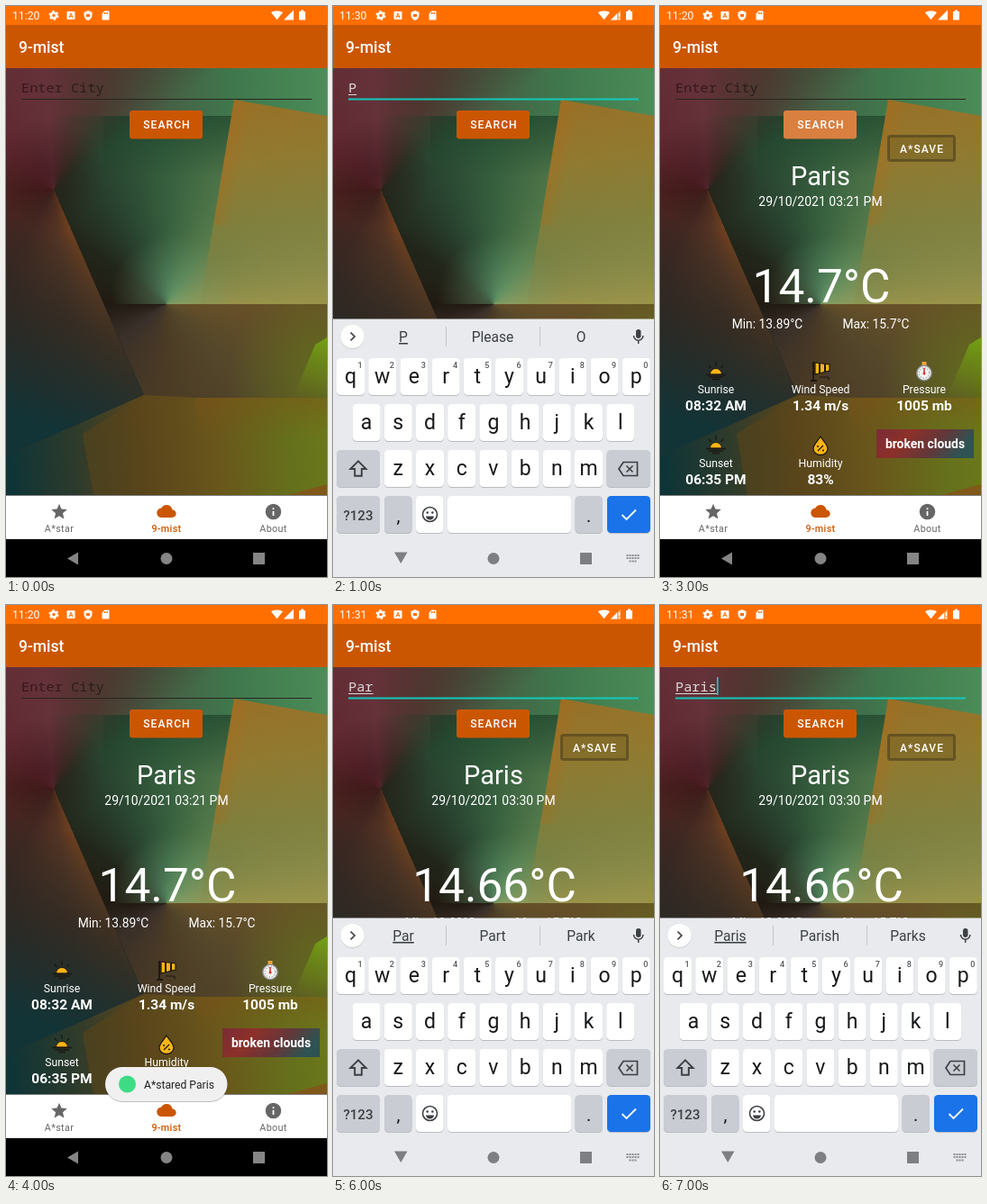
An HTML page with a canvas for the animation above (8000 ms loop, 356 by 634 pixels).

```html
<!DOCTYPE html>
<html lang="en">
<head>
<meta charset="utf-8">
<title>9-mist</title>
<style>
html, body { margin: 0; width: 100%; height: 100%; overflow: hidden; background: #000; }
canvas, svg { position: absolute; left: 0; top: 0; width: 356px; height: 634px; }
text { font-family: Roboto, sans-serif; white-space: pre; }
.mono { font-family: "Noto Sans Mono", "DejaVu Sans Mono", monospace; }
</style>
</head>
<body>
<canvas id="wall" width="356" height="634"></canvas>
<svg id="stage" viewBox="0 0 356 634"></svg>
<script>
const LOOP = 8000;
const ORANGE = '#cb5602', TEAL = '#12c9bb', GREY = '#666', INK = '#3c4043';

// ---- wallpaper ----
const ctx = document.getElementById('wall').getContext('2d');
const ALL = [0, 69, 356, 69, 356, 543, 0, 543];

function stops(g, list) {
  list.forEach(([at, color]) => g.addColorStop(at, color));
  return g;
}
const conic = (x, y, list) => stops(ctx.createConicGradient(0, x, y), list);
const linear = (x1, y1, x2, y2, list) => stops(ctx.createLinearGradient(x1, y1, x2, y2), list);
const radial = (x, y, r, list) => stops(ctx.createRadialGradient(x, y, 0, x, y, r), list);

function poly(points, fill) {
  ctx.beginPath();
  for (let i = 0; i < points.length; i += 2) ctx.lineTo(points[i], points[i + 1]);
  ctx.fillStyle = fill;
  ctx.fill();
}

function paintWall() {
  poly(ALL, conic(178, 331, [
    [0, '#675028'], [.12, '#54472a'], [.25, '#4b3b25'], [.4, '#3a302a'], [.5, '#211a12'],
    [.6, '#22261a'], [.68, '#294430'], [.75, '#365f3e'], [.84, '#557b4b'], [.92, '#7c874a'], [1, '#9a934a']]));
  poly([0, 69, 356, 69, 356, 331, 0, 331], radial(186, 323, 70, [[0, 'rgba(110,165,120,.55)'], [1, 'rgba(110,165,120,0)']]));
  poly([108, 122, 356, 122, 356, 240, 108, 240], linear(0, 122, 0, 190, [[0, 'rgba(22,62,40,.6)'], [1, 'rgba(22,62,40,0)']]));
  poly([0, 69, 356, 69, 356, 122, 0, 122], linear(0, 0, 356, 0, [
    [0, '#6b2f37'], [.2, '#573b35'], [.42, '#4a5742'], [.7, '#3f774c'], [1, '#4b8c58']]));
  // warm slab on the right
  poly([253, 104, 356, 122, 356, 331, 215, 331, 230, 243], linear(265, 105, 300, 331, [
    [0, '#987027'], [.3, '#917a31'], [.62, 'rgba(132,128,60,.85)'], [1, 'rgba(132,134,70,0)']]));
  poly([253, 104, 274, 108, 250, 243, 230, 243], linear(238, 170, 262, 174, [
    [0, 'rgba(170,105,25,.45)'], [1, 'rgba(170,105,25,0)']]));
  // red and rust fan on the left
  poly([0, 69, 356, 69, 356, 122, 153, 432, 0, 500], conic(53, 204, [
    [0, 'rgba(40,36,24,0)'], [.184, 'rgba(40,36,24,0)'], [.185, '#6e401f'], [.23, '#573523'],
    [.33, '#442821'], [.5, '#4b211f'], [.62, '#602730'], [.74, '#65323a'],
    [.82, 'rgba(76,50,44,.7)'], [.9, 'rgba(50,45,32,0)'], [1, 'rgba(40,36,24,0)']]));
  poly([0, 150, 53, 204, 153, 432, 0, 500], linear(85, 255, 20, 460, [
    [0, 'rgba(22,40,40,0)'], [.45, 'rgba(30,38,36,.6)'], [1, '#123437']]));
  poly(ALL, radial(48, 186, 62, [[0, 'rgba(40,12,14,.45)'], [1, 'rgba(40,12,14,0)']]));
  // lower panels
  poly([0, 500, 153, 432, 210, 435, 356, 435, 356, 543, 0, 543], linear(0, 500, 356, 470, [
    [0, '#0d3437'], [.2, '#2b3a2c'], [.42, '#57451d'], [.65, '#69561b'], [.88, '#65701c'], [1, '#6b781a']]));
  poly([85, 475, 153, 432, 356, 435, 356, 543, 97, 543], linear(85, 500, 220, 490, [
    [0, 'rgba(98,70,20,.5)'], [1, 'rgba(98,70,20,0)']]));
  poly([210, 435, 356, 435, 356, 480, 210, 480], linear(0, 435, 0, 480, [
    [0, 'rgba(125,82,24,.45)'], [1, 'rgba(125,82,24,0)']]));
  poly([200, 331, 356, 331, 356, 435, 200, 435], radial(356, 410, 110, [
    [0, 'rgba(100,120,25,.75)'], [1, 'rgba(100,120,25,0)']]));
  poly([356, 368, 343, 376, 318, 435, 356, 435], linear(350, 370, 342, 435, [
    [0, '#72a013'], [1, 'rgba(110,140,20,0)']]));
  poly([312, 543, 356, 531, 356, 543], '#80581a');
}

// ---- drawing helpers ----
const attrs = o => Object.entries(o).map(([k, v]) => ` ${k}="${v}"`).join('');
const tag = (name, o) => `<${name}${attrs(o)}/>`;
const rect = (x, y, width, height, fill, more = {}) => tag('rect', { x, y, width, height, fill, ...more });
const disc = (cx, cy, r, fill, more = {}) => tag('circle', { cx, cy, r, fill, ...more });
const path = (d, fill, more = {}) => tag('path', { d, fill, ...more });
const line = (d, stroke, w = 1, more = {}) => path(d, 'none', { stroke, 'stroke-width': w, ...more });
const text = (x, y, size, str, more = {}) =>
  `<text${attrs({ x, y, 'font-size': size, fill: '#fff', 'text-anchor': 'middle', ...more })}>${str}</text>`;
const group = (id, body) => `<g id="${id}">${body}</g>`;
const icon = (cx, cy, size, d, fill) =>
  path(d, fill, { transform: `translate(${cx - size / 2} ${cy - size / 2}) scale(${size / 24})`, 'fill-rule': 'evenodd' });

const STAR = 'M12 17.3 18.2 21l-1.6-7L22 9.2l-7.2-.6L12 2 9.2 8.600 2 9.200 7.500 14 5.800 21z';
const CLOUD = 'M19.400 10A7.500 7.500 0 0 0 5.400 8 6 6 0 0 0 6 20H19a5 5 0 0 0 .4-10z';
const INFO = 'M12 2a10 10 0 1 0 0 20 10 10 0 0 0 0-20zM11 7h2v2h-2zM11 11h2v6h-2z';
const SHIELD = 'M12 1 3 5v6c0 5.500 3.800 10.700 9 12 5.200-1.300 9-6.500 9-12V5zM8 9h8v6H8z';
const CARD = 'M18 2h-8L4 8v12a2 2 0 0 0 2 2h12a2 2 0 0 0 2-2V4a2 2 0 0 0-2-2zM9 5h2v4H9zM12 5h2v4h-2zM15 5h2v4h-2z';
const WIFI = 'M12 21.500 24 7C19 2.500 5 2.500 0 7z';
const SHIFT = 'M12 3 3 12h5v8h8v-8h5z';

function statusBar() {
  const gear = disc(53, 10.500, 3, 'none', { stroke: '#fff', 'stroke-width': 2.600 }) +
    disc(53, 10.500, 4.700, 'none', { stroke: '#fff', 'stroke-width': 1.600, 'stroke-dasharray': '2.46 2.46' });
  return rect(0, 0, 356, 21, '#ff6f00') + rect(0, 21, 356, 48, ORANGE) +
    text(7, 15, 12.200, '', { id: 'clock', 'text-anchor': 'start' }) + gear +
    rect(67.500, 6, 9, 9, '#fff', { rx: 1 }) + text(72, 13.300, 7.500, 'A', { fill: '#ff6f00', 'font-weight': 700 }) +
    icon(91, 10.500, 12, SHIELD, '#fff') + icon(110.500, 10.500, 12, CARD, '#fff') +
    icon(300.500, 10, 13, WIFI, '#fff') +
    group('full', path('M308 15.500h11V4.500z', '#fff')) +
    group('weak', path('M308 15.500h11V4.500z', '#fff', { opacity: .4 }) + path('M308 15.500h7V8.500z', '#fff') +
      line('M317.500 8v4M317.500 13.500v2', '#fff', 1.300)) +
    path('M325 6h2v-1.500h3v1.500h2v9.500h-7z', '#fff') +
    text(14, 52, 17.500, '9-mist', { 'text-anchor': 'start', 'font-weight': 500 });
}

function form() {
  return text(17, 96, 15.300, 'Enter City', { id: 'hint', class: 'mono', fill: '#000', 'fill-opacity': .48, 'text-anchor': 'start' }) +
    text(17, 96, 15.300, '', { id: 'typed', class: 'mono', fill: '#dcd9d8', 'text-anchor': 'start' }) +
    line('', '#dcd9d8', 1, { id: 'compose' }) +
    rect(63, 80, 1.700, 20, TEAL, { id: 'caret' }) +
    line('M17 103.500H339', '#222', 1, { id: 'rule' }) +
    rect(137, 116, 81, 31.500, ORANGE, { id: 'search', rx: 3 }) +
    text(178.500, 136, 12.100, 'SEARCH', { 'font-weight': 500, 'letter-spacing': 1.050 });
}

function sun(y) {
  return path(`M55.500 ${y + 4}a6.500 6.500 0 0 1 13 0z`, '#fdb515', { stroke: '#1c1712' }) +
    line(`M51 ${y + 4.500}h22M54 ${y + 7}h16M58 ${y + 9.500}h8`, '#1c1712', 1.300) +
    line(`M62 ${y - 10}v5M54 ${y - 6}l2.500 3M70 ${y - 6}l-2.500 3`, '#1c1712', 1.300);
}

function windsock() {
  return line('M170 395v21M167 416h7', '#1c1712', 1.800) +
    path('M172 396 188 398v7l-16 4z', '#fdb515', { stroke: '#1c1712', 'stroke-width': 1.200 }) +
    line('M177 397v10.500M183 398v8', '#1c1712', 2) +
    line('M177 412h8q3 0 2 3', '#1c1712', 1.200);
}

function gauge() {
  return rect(290.500, 395, 5, 4, '#f0a23c') + disc(293, 407.500, 8.200, '#f4f4f2', { stroke: '#8d8f94', 'stroke-width': 1.500 }) +
    disc(293, 407.500, 5.700, 'none', { stroke: '#555', 'stroke-width': 1, 'stroke-dasharray': '1 2' }) +
    line('M293 402v6', '#d8342e', 1.600) + disc(293, 408, 1.500, '#d8342e');
}

function results() {
  const pair = (x, y, name, value) => text(x, y, 12.250, name) + text(x, y + 19, 15.500, value, { 'font-weight': 700 });
  return text(178, 198.500, 29, 'Paris') + text(178, 221.500, 14, '', { id: 'date' }) +
    text(179, 329, 51.400, '', { id: 'temp' }) +
    text(119, 357.500, 13.800, 'Min: 13.89°C') + text(239.500, 357.500, 13.800, 'Max: 15.7°C') +
    sun(405) + windsock() + gauge() + sun(487) +
    path('M178 478c3 5 8 9 8 13.500a8 7 0 0 1-16 0c0-4.500 5-8.500 8-13.500z', '#fdb515', { stroke: '#1c1712', 'stroke-width': 1.300 }) +
    line('M175 494l6-6', '#1c1712', 1.200) + disc(175, 489, 1, '#1c1712') + disc(181, 493.500, 1, '#1c1712') +
    pair(62, 430, 'Sunrise', '08:32 AM') + pair(178, 430, 'Wind Speed', '1.34 m/s') +
    pair(293, 430, 'Pressure', '1005 mb') + pair(62, 512, 'Sunset', '06:35 PM') + pair(178, 512, 'Humidity', '83%') +
    rect(240, 470, 108, 32, 'url(#badge)') + text(294, 491, 13.900, 'broken clouds', { 'font-weight': 700 }) +
    group('save', rect(253.500, 144.500, 73, 27, 'rgba(90,75,25,.25)', { rx: 2, stroke: '#57481f', 'stroke-width': 3, 'stroke-opacity': .75 }) +
      text(290.500, 162.500, 12, 'A*SAVE', { 'font-weight': 500, 'letter-spacing': 1.050 }));
}

function tabs() {
  const label = (x, str, fill, weight = 400) =>
    text(x, 584, 10.800, str, { fill, 'font-weight': weight, 'letter-spacing': .35 });
  return rect(0, 543.500, 356, 49, '#fff') + rect(0, 592, 356, 42, '#000') +
    icon(59, 561.500, 21, STAR, GREY) + icon(178, 561, 21, CLOUD, ORANGE) + icon(296.500, 561.500, 21, INFO, GREY) +
    label(59, 'A*star', GREY) + label(178, '9-mist', ORANGE, 500) + label(296.500, 'About', GREY) +
    path('M68 613.500 80 606.500v14z', '#858585') + homeButtons('#858585');
}

const homeButtons = fill => disc(178, 613.500, 6.500, fill) + rect(274, 607, 13, 13, fill);

function toast() {
  return rect(110, 514, 135.500, 38, '#000', { rx: 19, opacity: .25 }) + rect(110, 513, 135.500, 38, '#f1f0f0', { rx: 19 }) +
    disc(134.500, 532, 9.500, '#3ddc84') + text(192, 536.500, 12.150, 'A*stared Paris', { fill: '#222' });
}

function key(x, y, w, fill = '#fff') {
  return rect(x, y + 1, w, 41, '#b9bcc1', { rx: 4.500 }) + rect(x, y, w, 41, fill, { rx: 4.500 });
}

function keyboard() {
  const PITCH = 35.200, DIM = '#c9ccd2';
  const row = (letters, x0, y, digits) => [...letters].map((c, i) => {
    const x = x0 + i * PITCH;
    return key(x, y, 31) + text(x + 15.500, y + 28, 23, c, { fill: '#17181a' }) +
      (digits ? text(x + 26, y + 11, 9, (i + 1) % 10, { fill: '#55585c', 'font-weight': 500 }) : '');
  }).join('');
  const words = [78, 177, 275].map((x, i) => text(x, 373, 15.600, '', { id: 'word' + i, fill: INK })).join('');
  return rect(0, 347.500, 356, 287, '#e8eaed') +
    disc(21.500, 368, 13, '#c9ccd0') + disc(21.500, 367, 13, '#fff') + line('M19.500 362.500l4.500 4.500-4.500 4.500', INK, 1.700) +
    words + line('M125.500 356v22M229.500 356v22', '#c4c7cb') +
    rect(336, 359, 5.500, 10, INK, { rx: 2.750 }) + line('M333.500 366a5.200 5.200 0 0 0 10.400 0M338.700 371v4', INK, 1.500) +
    row('qwertyuiop', 4, 391, true) + row('asdfghjkl', 21.600, 442) + row('zxcvbnm', 56.800, 493) +
    key(4, 493, 48, DIM) + icon(28, 514, 23, SHIFT, 'none').replace('/>', ` stroke="${INK}" stroke-width="2"/>`) +
    key(303.500, 493, 48.500, DIM) + line('M317 514l5-7.500h15.500v15H322z', INK, 1.700) + line('M325.500 510.500l7 7m0-7l-7 7', INK, 1.600) +
    key(4, 544, 48, DIM) + text(28, 570.500, 15, '?123', { fill: INK, 'font-weight': 500 }) +
    key(57, 544, 30.500, DIM) + text(72.500, 573, 20, ',', { fill: '#17181a' }) +
    key(92, 544, 30.500) + disc(107.500, 564.500, 8, 'none', { stroke: INK, 'stroke-width': 1.600 }) +
    disc(104.700, 562.500, 1.300, INK) + disc(110.300, 562.500, 1.300, INK) + path('M103 566.500h9a4.500 4 0 0 1-9 0z', INK) +
    key(127, 544, 137) + key(268.500, 544, 30.500, DIM) + text(283.700, 573, 20, '.', { fill: '#17181a' }) +
    key(304, 544, 48, '#1a73e8') + line('M320.500 565l5 5 10.500-10.500', '#fff', 1.900) +
    path('M68 606.500h14.500l-7.250 12.500z', '#7d7f82') + homeButtons('#7d7f82') +
    line('M325.500 610h14M325.500 613h14M328.500 616.500h8', '#8b8d90', 1.800, { 'stroke-dasharray': '2 1' });
}

paintWall();
document.getElementById('stage').innerHTML =
  `<defs><linearGradient id="badge" x2="1" y2=".25"><stop stop-color="#7a2c37"/><stop offset=".35" stop-color="#8d3029"/>
  <stop offset=".7" stop-color="#63373a"/><stop offset="1" stop-color="#2e5352"/></linearGradient></defs>` +
  statusBar() + form() + group('result', results()) + tabs() + group('toast', toast()) + group('keys', keyboard());

// ---- timeline ----
const EARLY = { date: '29/10/2021 03:21 PM', temp: '14.7°C' };
const LATE = { date: '29/10/2021 03:30 PM', temp: '14.66°C' };
const P = ['P', 'Please', 'O'], PAR = ['Par', 'Part', 'Park'], PARIS = ['Paris', 'Parish', 'Parks'];
const STEPS = [
  { at: 0, clock: '11:20' },
  { at: 1000, clock: '11:30', words: P },
  { at: 2000, clock: '11:30', words: PARIS, caret: true },
  { at: 3000, clock: '11:20', data: EARLY, save: true, pressed: true },
  { at: 4000, clock: '11:20', data: EARLY, toast: true },
  { at: 5000, clock: '11:31', words: P, data: LATE, save: true },
  { at: 6000, clock: '11:31', words: PAR, data: LATE, save: true },
  { at: 7000, clock: '11:31', words: PARIS, data: LATE, save: true, caret: true },
];

const $ = id => document.getElementById(id);
const show = (id, on) => $(id).setAttribute('display', on ? 'inline' : 'none');
const write = (id, str) => { $(id).textContent = str; };

function apply({ clock, words, data, save, pressed, toast, caret }) {
  const typed = words ? words[0] : '';
  write('clock', clock);
  write('typed', typed);
  $('compose').setAttribute('d', `M17 98.500h${typed.length * 9.200}`);
  show('compose', words);
  show('hint', !words);
  show('caret', caret);
  show('keys', words);
  show('weak', words);
  show('full', !words);
  show('toast', toast);
  show('result', data);
  show('save', save);
  $('rule').setAttribute('stroke', words ? TEAL : '#2a2520');
  $('rule').setAttribute('stroke-width', words ? 1.800 : 1);
  $('search').setAttribute('fill', pressed ? '#d98040' : ORANGE);
  if (data) { write('date', data.date); write('temp', data.temp); }
  if (words) words.forEach((w, i) => write('word' + i, w));
  $('word0').setAttribute('text-decoration', 'underline');
}

let current = null;
function tick() {
  const t = performance.now() % LOOP;
  const step = STEPS.findLast(s => s.at <= t);
  if (step !== current) apply(current = step);
  requestAnimationFrame(tick);
}
tick();
</script>
</body>
</html>
```
